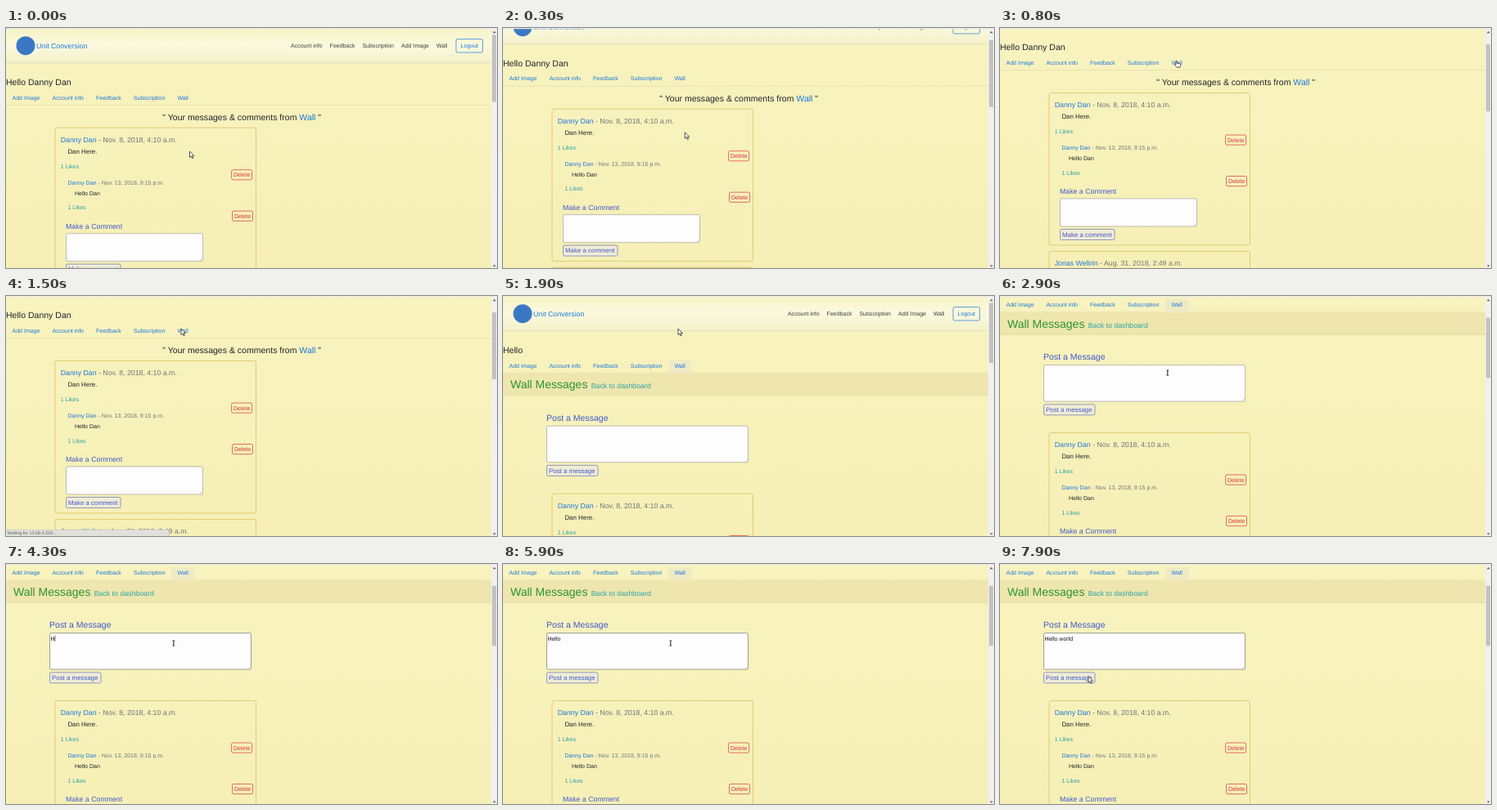
An HTML page that plays this animation: 600x294 px, repeating every 8 s.

```html
<!DOCTYPE html>
<html lang="en">
<head>
<meta charset="utf-8">
<title>Posting a wall message</title>
<style>
  html, body { margin: 0; width: 100%; height: 100%; overflow: hidden; }
  svg { display: block; width: 600px; height: 294px; }
  text { font-family: "Liberation Sans", Arial, sans-serif; text-rendering: geometricPrecision; white-space: pre; }
</style>
</head>
<body>
<svg id="stage" viewBox="0 0 600 294"></svg>
<script>
const LOOP = 8000;
const BLUE = '#1d78dc', INK = '#212529', GREY = '#70757a', TEAL = '#2ba3a6',
      INDIGO = '#4059cf', RED = '#d8343f', GOLD = '#dcbc50';
// Type sizes: the 1366 px wide page is shown at 600 px
const XS = 5.4, S = 7.03, M = 7.9, L = 8.78, XL = 10.54, XXL = 14;

const text = (x, y, size, fill, str, attrs = '') =>
  `<text x="${x}" y="${y}" font-size="${size}" fill="${fill}" ${attrs}>${str}</text>`;
const span = (fill, str) => `<tspan fill="${fill}">${str}</tspan>`;
const box = (x, y, w, h, fill, stroke = 'none', r = 0, attrs = '') =>
  `<rect x="${x}" y="${y}" width="${w}" height="${h}" rx="${r}" fill="${fill}" stroke="${stroke}" stroke-width=".7" ${attrs}/>`;
const rule = (y, color) => `<path d="M0 ${y}H593" stroke="${color}" stroke-width=".7"/>`;
const group = (id, y, body) => `<g id="${id}" transform="translate(0 ${y})">${body}</g>`;

const textarea = (x, y, w, h, attrs) => box(x, y, w, h, '#fefdfd', '#a3a39c', 1.5, attrs) +
  `<path d="M${x + w - 3.5} ${y + h - 1}l2.5 -2.5m-1 2.5l1 -1" stroke="#888" stroke-width=".4"/>`;
const deleteButton = (x, y) =>
  box(x, y, 25, 12.2, 'none', RED, 1.8) + text(x + 2.4, y + 8.7, S, RED, 'Delete');
const button = (x, y, w, label) =>
  box(x, y, w, 13, '#f0ecd6', '#6673b8', 1.8) + text(x + 2.5, y + 9.3, M, INDIGO, label);
const byline = (x, y, size, name, date) => text(x, y, size, BLUE, name + span(GREY, ' - ' + date));

const card = top => `<g transform="translate(0 ${top})">` +
  box(60, 0, 245.5, 186.5, 'none', GOLD, 2) +
  byline(66.7, 17.5, L, 'Danny Dan', 'Nov. 8, 2018, 4:10 a.m.') +
  text(75.4, 31.5, M, INK, 'Dan Here.') +
  text(66.7, 49.5, S, TEAL, '1 Likes') +
  deleteButton(275.6, 51.5) +
  byline(75.4, 69.6, S, 'Danny Dan', 'Nov. 13, 2018, 9:15 p.m.') +
  text(84, 82.4, S, INK, 'Hello Dan') +
  text(75.4, 100, S, TEAL, '1 Likes') +
  deleteButton(276.5, 102) +
  text(73, 123.7, L, INDIGO, 'Make a Comment') +
  textarea(73.5, 129.5, 167, 34) +
  button(73.5, 167, 66.5, 'Make a comment') +
  box(60, 194, 245.5, 186.5, 'none', GOLD, 2) +
  byline(66.7, 211.4, L, 'Jonas Weltrin', 'Aug. 31, 2018, 2:49 a.m.') + '</g>';

const links = (y, color, items) => items.map(([label, x]) => text(x, y, S, color, label)).join('');

const header = greeting =>
  box(0, 0, 593, 42.5, 'url(#nav)') + rule(42.7, '#d9d7bd') +
  '<circle cx="24" cy="21.7" r="11.5" fill="#3b78c4"/>' +
  text(37, 25, L, BLUE, 'Unit Conversion') +
  links(24.3, '#3c3d36', [['Account info', 348], ['Feedback', 395.6], ['Subscription', 435.4],
                          ['Add Image', 483], ['Wall', 526]]) +
  box(550, 13.6, 32.6, 16.4, 'none', BLUE, 1.8) + text(555.6, 24.3, S, BLUE, 'Logout') +
  text(0, 69.8, XL, INK, greeting) + rule(94.3, '#e3dcae');

const tabs = links(87.5, BLUE, [['Add Image', 7.5], ['Account info', 56.4], ['Feedback', 110],
                                ['Subscription', 155.8], ['Wall', 209.4]]);

const dashboard = header('Hello Danny Dan') + tabs +
  text(191.3, 112.8, XL, INK, `" Your messages &amp; comments from ${span(BLUE, 'Wall')} "`) +
  card(122.2);

const wall = header('Hello') +
  box(202, 78.4, 28.5, 16.2, '#efeac6') + tabs +
  box(0, 94.8, 593, 26.8, '#eee6ae') + rule(121.8, '#dbd3a0') +
  text(9, 113.4, XXL, '#2b9430', 'Wall Messages') +
  text(107.7, 113.4, L, TEAL, 'Back to dashboard') +
  text(53, 153.1, XL, INDIGO, 'Post a Message') +
  textarea(53.5, 159.2, 246, 44.5, 'id="field"') +
  text(54.4, 168.2, S, '#111', '', 'id="typed"') +
  box(0, 162, .6, 7.5, '#111', 'none', 0, 'id="caret"') +
  button(53.5, 207.4, 62.5, 'Post a message') +
  card(242.1);

const stage = document.getElementById('stage');
stage.innerHTML = `
  <defs>
    <linearGradient id="paper" x2="0" y2="1"><stop stop-color="#f8f3bf"/><stop offset="1" stop-color="#f6efb6"/></linearGradient>
    <linearGradient id="nav" x2="0" y2="1"><stop stop-color="#f7f4c6"/><stop offset=".5" stop-color="#fbf9de"/><stop offset="1" stop-color="#f4f1ca"/></linearGradient>
  </defs>` +
  box(0, 0, 600, 294, 'url(#paper)') +
  group('dashboard', 0, dashboard) + group('wall', 0, wall) +
  box(0, 0, 600, 1.2, '#e9e9e6') +
  box(593, 1, 7, 293, '#f0f0ee') + box(594, 0, 5, 80, '#c1c1c1', 'none', 0, 'id="thumb"') +
  '<path d="M594.8 6.2l2 -2.4l2 2.4zM594.8 290.4l2 2.4l2 -2.4z" fill="#666"/>' +
  group('status', 0, box(-1, 286.4, 200, 9, '#e1e1dc', '#c9c9c4', 1) +
    text(1.5, 292.2, XS, '#5c5c5c', 'Waiting for 13.58.4.233...')) +
  `<g id="cursor" stroke="#2b2b35" stroke-width=".8" stroke-linejoin="round" fill="#fff">
    <path id="arrow" d="M0 0V7.6L1.8 6L3.1 8.9L4.4 8.3L3.1 5.5H5.4Z"/>
    <path id="hand" d="M1.3 0Q2.3 -.3 2.3 .8V3.2L5.5 3.7Q6.8 4 6.6 5.4L6 8.2H2L-.6 5.2Q-.7 4 .9 4.6V.6Z"/>
    <path id="beam" d="M-1.3 -3H1.3M0 -3V3M-1.3 3H1.3" stroke-width="1.1"/>
  </g>`;

const el = id => document.getElementById(id);
const show = (id, on) => el(id).setAttribute('display', on ? 'inline' : 'none');
const move = (id, x, y) => el(id).setAttribute('transform', `translate(${x} ${y})`);

// Eased value of column `col` along rows of [time, ...values]
function track(rows, t, col = 1) {
  const i = rows.findIndex(row => row[0] > t);
  if (i === 0) return rows[0][col];
  if (i < 0) return rows[rows.length - 1][col];
  const a = rows[i - 1], b = rows[i], u = (t - a[0]) / (b[0] - a[0]);
  return a[col] + (b[col] - a[col]) * u * u * (3 - 2 * u);
}

const LOAD = 1900, FOCUS = 3100;
const dashboardScroll = [[80, 0], [500, 42.7]];
const wallScroll = [[1950, 0], [2600, 74.6]];
const pointer = [[100, 224.5, 151], [780, 214, 40], [1900, 214, 40], [2280, 217, 147],
  [2400, 217, 147], [2850, 204.8, 94], [2950, 204.8, 94], [3150, 204.8, 97],
  [7050, 204.8, 97], [7800, 108, 137.5]];
const message = 'Hello world';
const keys = [3900, 4500, 4600, 4700, 4800, 6000, 6200, 6400, 6500, 6700, 6900];

function draw(now) {
  const t = now % LOOP, onWall = t >= LOAD;
  const scroll = track(onWall ? wallScroll : dashboardScroll, t);
  show('dashboard', !onWall);
  show('wall', onWall);
  move(onWall ? 'wall' : 'dashboard', 0, -scroll);
  el('thumb').setAttribute('y', 8.6 + scroll * (onWall ? .243 : .27));
  el('thumb').setAttribute('height', onWall ? 73.5 : 82);
  show('status', t >= 1000 && !onWall);

  const count = keys.filter(k => k <= t).length;
  const typed = el('typed');
  typed.textContent = message.slice(0, count);
  const sinceKey = t - (count ? keys[count - 1] : FOCUS);
  show('caret', sinceKey >= 0 && sinceKey % 1200 < 500);
  el('caret').setAttribute('x', 54.6 + (count ? typed.getComputedTextLength() : 0));
  el('field').setAttribute('stroke', t >= FOCUS ? '#77776f' : '#a3a39c');

  const x = track(pointer, t, 1), y = track(pointer, t, 2);
  const overField = t > 2600 && x > 118 && y < 129;
  const overLink = t >= 700 && t < 1400;
  move('cursor', x, y);
  show('beam', overField);
  show('hand', overLink);
  show('arrow', !overField && !overLink);
}

function frame() {
  draw(performance.now());
  requestAnimationFrame(frame);
}
frame();
</script>
</body>
</html>
```
